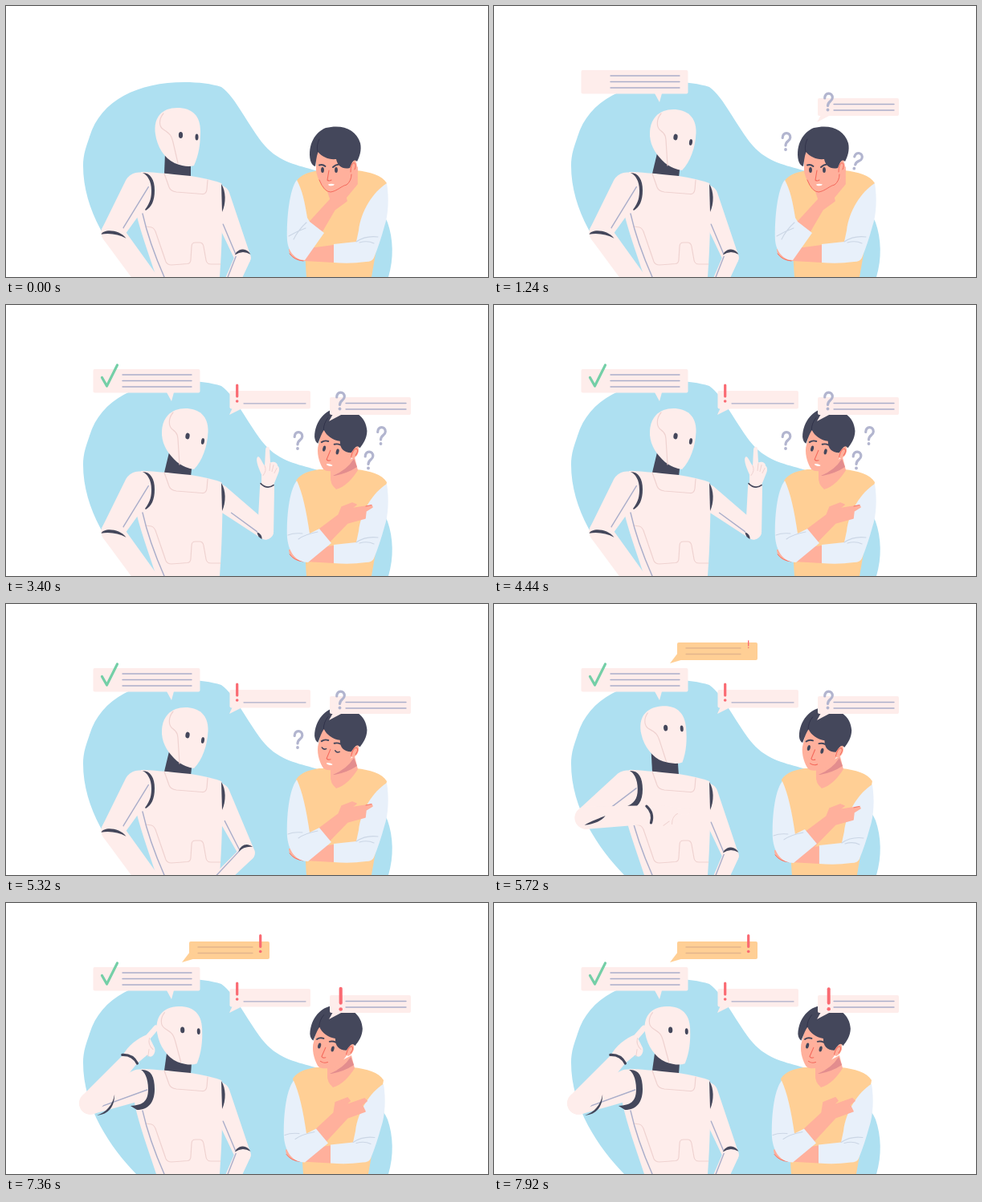
These frames come from a looping animation (600x338 px, 8000 ms). An HTML page with a canvas:

```html
<!DOCTYPE html>
<html lang="en">
<head>
<meta charset="utf-8">
<title>Robot and thinker</title>
<style>
html, body { margin: 0; width: 100%; height: 100%; overflow: hidden; background: #fff; }
canvas { display: block; width: 600px; height: 338px; }
</style>
</head>
<body>
<canvas id="stage"></canvas>
<script>
const LOOP = 8000;
const PINK = '#feedeb', SEAM = '#efd2d0', DARK = '#44475b', LINE = '#aaaeca', GREY = '#b2b5cf';
const SKIN = '#ffb09c', RED = '#f4695c', ALERT = '#fa6a72', VEST = '#ffcf95', SLEEVE = '#e8f0fa', FOLD = '#cbd6e5';

const canvas = document.getElementById('stage'), ctx = canvas.getContext('2d');
const ratio = window.devicePixelRatio || 1;
canvas.width = 600 * ratio;
canvas.height = 338 * ratio;

// Timing helpers
const clamp = x => Math.max(0, Math.min(1, x));
const smooth = x => x * x * (3 - 2 * x);
const lerp = (a, b, k) => a + (b - a) * k;
const span = (t, from, to) => smooth(clamp((t - from) / (to - from)));
const pop = (t, from, to) => {
  const x = clamp((t - from) / (to - from)) - 1;
  return 1 + 2 * x * x * x + x * x;
};
const within = (t, ranges) => ranges.some(([a, b]) => t >= a && t < b);
function track(t, keys) {
  const next = keys.findIndex(k => k[0] > t);
  if (next === 0) return keys[0][1];
  if (next < 0) return keys[keys.length - 1][1];
  const [[t0, a], [t1, b]] = [keys[next - 1], keys[next]];
  return a.map((v, i) => lerp(v, b[i], span(t, t0, t1)));
}

// Drawing helpers
function morph(a, b, k) {
  const target = b.match(/-?[\d.]+/g);
  let i = 0;
  return a.replace(/-?[\d.]+/g, n => lerp(+n, +target[i++], k).toFixed(2));
}
function fill(path, color) {
  ctx.fillStyle = color;
  ctx.fill(new Path2D(path));
}
function stroke(path, color, width = 1.2) {
  ctx.strokeStyle = color;
  ctx.lineWidth = width;
  ctx.stroke(new Path2D(path));
}
function oval(x, y, rx, ry, color, tilt = 0) {
  ctx.fillStyle = color;
  ctx.beginPath();
  ctx.ellipse(x, y, rx, ry, tilt, 0, 7);
  ctx.fill();
}
function at(x, y, degrees, scale, draw) {
  if (scale <= 0) return;
  ctx.save();
  ctx.translate(x, y);
  ctx.rotate(degrees * Math.PI / 180);
  ctx.scale(scale, scale);
  draw();
  ctx.restore();
}
// Draws stage coordinates turned around a pivot that moves to x, y
const hinge = (x, y, degrees, px, py, draw) =>
  at(x, y, degrees, 1, () => { ctx.translate(-px, -py); draw(); });
const reach = (x, y, degrees, length) =>
  [x + length * Math.cos(degrees * Math.PI / 180), y + length * Math.sin(degrees * Math.PI / 180)];
function limb(length, r0, r1) {
  ctx.fillStyle = PINK;
  ctx.beginPath();
  ctx.arc(0, 0, r0, Math.PI / 2, Math.PI * 1.5);
  ctx.arc(length, 0, r1, -Math.PI / 2, Math.PI / 2);
  ctx.fill();
}
function crescent(x, y, r, center, half, thick) {
  at(x, y, center, 1, () => {
    const h = half * Math.PI / 180, c = Math.cos(h);
    ctx.fillStyle = DARK;
    ctx.beginPath();
    ctx.arc(0, 0, r, -h, h);
    ctx.quadraticCurveTo(2 * (r - thick) - r * c, 0, r * c, -r * Math.sin(h));
    ctx.fill();
  });
}

// Robot: [x, y, turn, profile, eye x, eye y]
const FRONT = [0, 0, 0, 0, 0, 0], SIDE = [0, 0, 0, 1, 0, 0], NOD = [0, 0, 2, 1, 0, 1];
const PONDER = [-3, 0, -6, 0, -.8, -7], IDEA = [2.5, 2, -2, 0, 0, -4.6];
const HEAD = [[880, FRONT], [1200, SIDE], [3600, SIDE], [3920, NOD], [4280, SIDE], [5340, SIDE],
  [5800, PONDER], [6880, PONDER], [7300, IDEA]];
const ROBOT_BLINKS = [[280, 440], [1960, 2300], [3640, 3800], [4480, 4640], [5980, 6160], [6960, 7120]];

// Right arm: [upper angle, upper length, fore angle, fore length, joint angle, joint spread]
const REST = [68, 82, -246, 58, -92, 68], OPEN = [45, 71, -70, 58, -190, 55], POINT = [37, 74, -88, 56, -215, 30];
const swing = (pose, d) => pose.map((v, i) => i === 2 ? v + d : v);
const RIGHT_ARM = [[1400, REST], [2000, OPEN], [2240, OPEN], [2400, swing(OPEN, -6)], [2560, OPEN],
  [2800, OPEN], [3320, POINT], [3600, POINT], [3800, swing(POINT, -6)], [4040, swing(POINT, 4)],
  [4280, POINT], [4600, POINT], [5540, REST]];
// Left arm: [upper angle, fore angle, raised]
const LEFT_ARM = [[5360, [121, 54, 0]], [6040, [160, -50, 1]], [6880, [160, -50, 1]], [7400, [159.5, -48, 1]]];

function robotHead(t) {
  const [x, y, turn, side, ex, ey] = track(t, HEAD);
  hinge(215 + x, 165 + y, turn, 215, 165, () => {
    fill(morph('M186 160C183 138 195 127 213 127C232 127 242 137 242 156C242 172 240 186 234 199Q225 202 210 196C197 190 188 175 186 160Z',
      'M194 162C193 140 206 129 223 129C240 129 252 138 251.5 158C251 176 244 195 234 205Q224 204 213 196C203 187 195 176 194 162Z', side), PINK);
    stroke(morph('M196 134C190 141 190 150 196 154C205 160 206 162 208 170L214 196',
      'M208 134C202 141 202 151 207 155C214 160 214 163 214.5 175L216 199', side), SEAM);
    const closed = within(t, ROBOT_BLINKS);
    [[217.5, 161, 226, 163.5, 2.6], [237.5, 163.5, 245, 170, 2]].forEach(([ax, ay, bx, by, rx]) => {
      const cx = lerp(ax, bx, side) + ex, cy = lerp(ay, by, side) + ey;
      if (closed) stroke(`M${cx - rx} ${cy + 1}q${rx} 2 ${2 * rx} 1`, DARK, 1.5);
      else oval(cx, cy, rx, 3.9, DARK, side * .15);
    });
  });
}

function openHand() {
  fill('M327 231L328 212C329 205 331 198 335 198C339 198 338 206 339 211L347 194C349 190 353 191 352 195L348 208L358 201C361 200 362 203 360 205C364 205 364 208 361 211L350 226Q346 233 341 237Q332 238 327 231Z', PINK);
  stroke('M337 225Q339 217 338 210M348 208L346 213M353 213L349 219', SEAM, 1);
  stroke('M327 231Q331 240 341 237', DARK, 1.6);
}
function pointingHand() {
  fill('M318 224L318 212C315 205 310 194 313 190C316 188 318 196 322 201L323 181C323 176 328 176 328 180L329 197C333 195 338 197 338 201C341 203 340 208 339 210L333 225Q325 231 318 224Z', PINK);
  stroke('M322 201Q325 207 320 213M329 198L328 207M333 200L331 208M337 204L334 210', SEAM, 1);
  stroke('M317 223Q325 231 333 225', DARK, 1.6);
}
function leftHand() {
  fill('M142 188C147 177 160 166 170 162L179 151C183 147 186 152 183 157L175 167L181 178C183 185 178 190 175 189L172 187L160 198Z', PINK);
  stroke('M174 166Q172 174 179 180M174 180L173 189', SEAM, 1);
  stroke('M141 188Q154 187 160 198', DARK, 3.2);
}

function robot(t) {
  const [upper, length, fore, foreLength, joint, spread] = track(t, RIGHT_ARM);
  const elbow = reach(264, 238, upper, length), wrist = reach(...elbow, fore, foreLength);
  at(264, 238, upper, 1, () => {
    limb(length, 15, 10);
    stroke(`M${length - 48} 7L${length - 8} 6.5`, LINE, 1.4);
  });
  const [x, , , side] = track(t, HEAD);
  fill(`M${198 + side * 5 + x} 184L197 209L230 214L${230 + side * 2 + x * .5} 196Z`, DARK);
  fill('M168 207C180 207 200 209 230 212Q255 216 268 221Q271 226 270 235C269 270 269 300 266 338L187 338C178 310 165 275 160 250Z', PINK);
  fill('M268 222C274 231 274 246 269 257Z', DARK);
  stroke('M197 209L203 226Q205 231 212 232L244 234.5Q249 235 250 229L251 217M174 275L181 276Q185 277 187 284L199 319Q201 323 206 323L226 321.5Q230 321 230 316L231 300Q231 295 236 295L241 295Q245 295 246 300L249 317Q250 322 255 322L267 322', SEAM);
  stroke('M170 259Q178 295 197 338', LINE, 1.4);
  at(...elbow, fore, 1, () => {
    limb(foreLength, 10, 9);
    ctx.globalAlpha = clamp((-fore - 190) / 30);
    stroke('M2 8.5L56 6', LINE, 1.4);
  });
  crescent(...elbow, 10.5, joint, spread, 3.4);
  const pointing = t >= 3040;
  if (pointing) hinge(...wrist, fore + 88, 325, 227, pointingHand);
  else hinge(...wrist, fore + 70, 334, 234, openHand);

  robotHead(t);

  const [lUpper, lFore, raised] = track(t, LEFT_ARM);
  const lElbow = reach(166, 227, lUpper, 65), lLength = lerp(84, 74, raised);
  at(166, 227, lUpper, 1, () => {
    limb(65, 19.5, 14);
    stroke('M-7 -9L57 -8.5', LINE, 1.4);
  });
  fill(morph('M170 208C180 208 185 217 185 230C185 243 181 251 174 255L173 254C180 245 181 238 181 230C181 218 176 211 170 208Z',
    'M168 208C180 207 185 216 185 232C185 248 178 258 163 258L155 253C170 252 177 248 177 232C177 218 172 210 168 208Z', raised), DARK);
  at(...lElbow, lFore, 1, () => limb(lLength, 14, lerp(13.5, 10, raised)));
  at(...lElbow, 0, 1, () => fill(morph('M-14 2C-11 -5 9 -4 17 7C8 2 -4 0 -14 2Z',
    'M8 15C19 12 28 2 30 -11C30 4 23 14 8 15Z', raised), DARK));
  if (raised > 0) hinge(...reach(...lElbow, lFore, lLength), lFore + 50, 151, 193, leftHand);
}

// Man
const MAN_HEAD = [[2780, [402.5, 204, 0]], [3300, [404.5, 180.5, 13]], [3600, [404.5, 180.5, 13]],
  [3920, [404, 181.5, 12]], [4280, [404.5, 180.5, 13]], [5320, [404.5, 180.5, 13]],
  [5900, [399, 181, 13]], [6880, [399, 181, 13]], [7400, [398.5, 179.5, 14]]];
const MAN_BODY = [[2780, [0, 0]], [3320, [0, 2]], [5320, [0, 2]], [5900, [-4, 4.5]]];
const MAN_BLINKS = [[280, 440], [1960, 2300], [3680, 3840], [4520, 4680], [5270, 5400], [6100, 6680], [7200, 7320]];

function manHead(t, relaxed) {
  fill('M386 182L386 205C387 215 394 226 399 230Q406 234 424 222L430 208L437 190L410 178Z', SKIN);
  oval(432.5, 201, 3.8, 7.5, SKIN, .25);
  stroke('M429 207Q429 197 433 195.5Q437 197 434 204', RED, 1);
  fill('M379 193C375 173 385 157 398 152C419 147 436 154 441 171C443 180 440 188 437 194C433 190 431 194 428 202C419 204 413 200 411 191C402 192 393 188 388.5 182C386 189 386 195 385 200Q381 199 379 193Z', DARK);
  stroke('M390 166Q386 174 388 182', '#31334a', .9);
  const closed = within(t, MAN_BLINKS);
  for (const x of [394, 411]) {
    if (closed) stroke(`M${x - 2.8} 205q2.600 2.800 5.600 .4`, DARK, 1.5);
    else oval(x, 204.5, 1.9, 3.6, DARK);
  }
  stroke(morph('M390 198.5Q394 197 397.5 200M407 201Q410 198 414 197.5',
    'M389 197.5Q392 194 397 194.5M405 196.5Q409 194.5 412.5 195.5', relaxed), DARK, 1.9);
  stroke('M402 205L400 217Q402 219 405 217', RED, 1.1);
  if (t < 5700) fill('M401 222.5Q405 221 409 222.5Q408 225 402 224Z', '#fff');
  else stroke('M400 223Q405 225 409 222', RED, 1.1);
}

function man(t) {
  const k = span(t, 2780, 3320), gesture = span(t, 6880, 7400);
  const [dx, dy] = track(t, MAN_BODY), [hx, hy, turn] = track(t, MAN_HEAD);
  at(dx, 0, 0, 1, () => {
    fill('M361 219C368 209 378 207 390 205L436 205C453 207 468 211 474 221C468 255 464 290 455 338L374 338C372 300 368 250 361 219Z', VEST);
    fill('M404 206L434 190L438 206C432 216 422 227 411 230Q403 223 404 214Z', SKIN);
    if (k > .3) fill('M407 213Q424 206 433 192L437 202Q425 210 409 213Z', '#e38d8e');
  });
  at(dx, dy, 0, 1, () => {
    fill('M352 303C352 312 360 318 372 318L408 320L408 298L385 301Z', SKIN);
    stroke('M353 309Q359 317 370 318', RED, .9);
    fill('M474 221C477 240 476 260 471 275Q465 297 458 314Q456 319 448 319Q428 322 408 320L408 297L436 294L439 280C442 255 457 232 474 221Z', SLEEVE);
    stroke('M436 294Q448 286 463 288M440 295Q450 292 458 296', FOLD, 1.1);
  });
  hinge(hx, hy, turn, 402.5, 204, () => manHead(t, k));
  at(0, dy * 1.5, 0, 1, () => {
    const chin = 'M372 276L404 241L401 232L410 230L424 224L431 213L437 201L437 222L423 239L424 243L409 254L388 290Z';
    const chest = 'M382 283L414 259L418 249L431 244L436 246L429 251L455 247L456 249L448 254L447 263L425 269L396 299Z';
    const heart = 'M378 283L408 255L410 242L425 236L428 240L421 246L446 237L449 240L443 245L447 253L425 261L392 297Z';
    const forearm = morph(morph(chin, chest, k), heart, gesture);
    fill(forearm, SKIN);
    stroke(forearm, SKIN, 1.6);
    if (k < .25) stroke('M390 217Q396 232 404 232C412 231 418 224 424 223Q430 218 430 210', RED, 1);
    if (k > .8 && gesture < .5) stroke('M448 248L455 246.5', RED, .8);
  });
  at(dx, dy, 0, 1, () => {
    fill(morph('M362 217C353 228 349 265 350 292C351 306 360 317 372 317L396 283L378 269L375 264C372 245 369 230 362 217Z',
      'M362 217C352 230 349 265 350 288C352 308 362 319 376 319L405 295L390 277L378 283C374 255 369 232 362 217Z', k), SLEEVE);
    stroke(morph('M352 287Q362 281 373 277M358 291Q364 279 374 270',
      'M351 285Q358 282 369 283M364 290Q372 284 388 281', k), FOLD, 1.1);
  });
}

// Signs and speech bubbles
function question(x, y, scale, tilt = 0) {
  at(x, y, tilt, scale, () => {
    stroke('M-4.8 -4.5C-5 -12.3 5 -12.3 4.8 -5C4.7 -.5 -1 -1 -1 5', GREY, 3.2);
    oval(-1, 10, 1.9, 1.9, GREY);
  });
}
function exclamation(x, y, scale) {
  at(x, y, 0, scale, () => {
    stroke('M0 -9.5L0 4.5', ALERT, 3.2);
    oval(0, 10.5, 1.8, 1.8, ALERT);
  });
}
function bubble(t, start, x, y, w, h, tail, tip, color, lines, [x0, x1], lineColor) {
  at(...tip, 0, pop(t, start, start + 280), () => {
    ctx.translate(-tip[0], -tip[1]);
    ctx.fillStyle = color;
    ctx.beginPath();
    ctx.roundRect(x, y, w, h, 2);
    ctx.fill();
    fill(tail, color);
    lines.forEach((ly, i) => {
      const grown = span(t, start + 60 + i * 40, start + 240 + i * 40);
      if (grown > 0) stroke(`M${x0} ${ly}L${lerp(x0, x1, grown)} ${ly}`, lineColor, 1.3);
    });
  });
}
function signs(t) {
  bubble(t, 880, 108.5, 80, 133, 29.5, 'M200 109L206 120L209 109Z', [206, 120], PINK, [87, 94.5, 102], [145, 231], LINE);
  bubble(t, 2760, 278.5, 107, 100.5, 22.5, 'M282 128L278 137L294 129Z', [278, 137], PINK, [122.8], [296, 373], LINE);
  bubble(t, 200, 403, 115, 101, 22, 'M407 136L402 145L418 136.5Z', [402, 145], PINK, [122.5, 130], [423, 498], LINE);
  bubble(t, 5440, 228, 48, 100, 22, 'M229 61L219 74L236 69Z', [219, 74], VEST, [55, 62.5], [239, 307], '#e3b58c');

  const check = span(t, 1760, 2000);
  if (check > 0) {
    ctx.setLineDash([41.5 * check, 100]);
    stroke('M119.5 90.5L125.5 101L138.5 75', '#74cfa7', 3.2);
    ctx.setLineDash([]);
  }
  const swap = span(t, 6900, 7160);
  question(416.5, 119.5, pop(t, 360, 640) * (1 - swap));
  exclamation(287.7, 109.5, pop(t, 2960, 3280));
  exclamation(316.7, 50, pop(t, 5680, 6000));
  exclamation(416.7, 119, 1.25 * pop(t, 7120, 7440));
  [[364, 169, 900, 5400], [452, 193.5, 1100, 4480], [467.5, 163, 1340, 4720]].forEach(([x, y, on, off]) => {
    const grown = pop(t, on, on + 300);
    question(x, y, grown * (1 - span(t, off, off + 320)), 30 * (1 - span(t, on, on + 300)));
  });
}

const begin = performance.now();
function frame() {
  const t = (performance.now() - begin) % LOOP;
  ctx.setTransform(ratio, 0, 0, ratio, 0, 0);
  ctx.fillStyle = '#fff';
  ctx.fillRect(0, 0, 600, 338);
  ctx.lineCap = ctx.lineJoin = 'round';
  fill('M162 338C130 305 96 255 96 199C96 185 100 175 104 163C118 117 165 95 222 95C240 95 256 97 268 101C285 112 303 152 322 174C340 195 365 199 385 205C430 220 465 245 475 270C482 290 483 315 476 338Z', '#aee0f1');
  robot(t);
  man(t);
  signs(t);
  requestAnimationFrame(frame);
}
frame();
</script>
</body>
</html>
```
